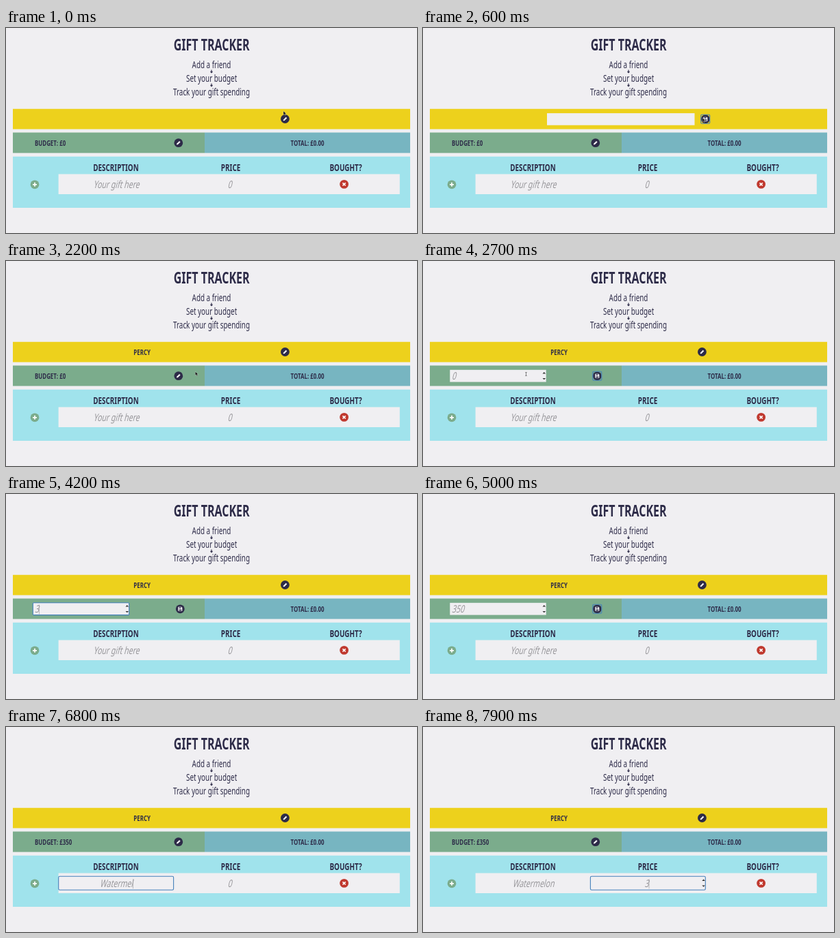
An HTML page that plays this animation: 600x301 px, repeating every 8 s.

```html
<!DOCTYPE html>
<html lang="en">
<head>
<meta charset="utf-8">
<title>Gift tracker</title>
<style>
html, body { margin: 0; width: 100%; height: 100%; overflow: hidden; background: #f0eff2; }
svg { display: block; width: 600px; height: 301px; --narrow: .7; }
text {
  font-family: "Noto Sans", "Open Sans", sans-serif;
  fill: #2d2b48;
  transform-box: fill-box;
  transform-origin: 0 78%;
  transform: scaleX(var(--narrow));
}
.mid { text-anchor: middle; transform-origin: 50% 78%; }
.title { font-size: 22.9px; font-weight: 600; }
.step { font-size: 14.1px; }
.label { font-size: 11.3px; font-weight: 600; }
.head { font-size: 14.1px; font-weight: 600; }
.field { font-size: 15px; fill: #98979b; transform: skewX(-14deg) scaleX(var(--narrow)); }
.box { fill: #f0eff2; }
.ring { fill: none; stroke: #4580bb; stroke-width: 1.1; }
.caret { stroke: #98979b; stroke-width: .6; }
</style>
</head>
<body>
<svg viewBox="0 0 600 301">
  <defs>
    <g id="pencil">
      <circle r="6.4" fill="#2d2b48"/>
      <path d="M-2.8 2.8l.5-1.9 3.6-3.6 1.5 1.5-3.6 3.6z" fill="#fff"/>
    </g>
    <g id="save">
      <circle r="6.4" fill="#2d2b48"/>
      <path d="M-3-3h4.9L3-1.9V3h-6z" fill="#fff"/>
      <path d="M-1.8-2.4h3v1.5h-3zM-1.9.6h3.8v1.8h-3.8z" fill="#2d2b48"/>
    </g>
    <path id="down" d="M0-2.3V1.6M-1.5.2L0 1.8 1.5.2" fill="none" stroke="#2d2b48" stroke-width="1.2"/>
    <path id="spin" d="M-2.3-3.2L0-5.6 2.3-3.2zM-2.3 3.2L0 5.6 2.3 3.2z" fill="#333"/>
  </defs>

  <text class="mid title" x="300" y="32.6">GIFT TRACKER</text>
  <text class="mid step" x="300" y="59.2">Add a friend</text>
  <text class="mid step" x="300" y="79.2">Set your budget</text>
  <text class="mid step" x="300" y="99.2">Track your gift spending</text>
  <use href="#down" x="300" y="63.7"/>
  <use href="#down" x="300" y="83.7"/>

  <path d="M10 118.8h580v29.8H10z" fill="#edd11c"/>
  <path d="M10 153.6h280v30H10z" fill="#7bac8c"/>
  <path d="M290 153.6h300v30H290z" fill="#77b5c1"/>
  <path d="M10 188.8h580v75.2H10z" fill="#a0e3ec"/>
  <path class="box" d="M76.6 214.4h498.2v29.5H76.6z"/>

  <!-- data-t: pairs of on/off times in ms -->
  <g data-t="0 500 2000 8000"><use href="#pencil" x="407.4" y="133.5"/></g>
  <text class="mid label" x="198.5" y="137.6" data-t="2000 8000">PERCY</text>
  <g data-t="500 2000">
    <rect class="box" x="181" y="125.1" width="215.5" height="17.6"/>
    <use href="#save" x="412.3" y="133.7"/>
  </g>
  <rect class="ring" x="181" y="125.1" width="215.5" height="17.6" rx="1.2" data-t="800 1900"/>
  <rect class="ring" x="405.7" y="127.2" width="13" height="13" rx="1.5" data-t="500 800 1900 2000"/>

  <text class="label" x="42" y="172.7" data-t="0 2400">BUDGET: £0</text>
  <text class="label" x="42" y="172.7" data-t="5200 8000">BUDGET: £350</text>
  <g data-t="0 2400 5200 8000"><use href="#pencil" x="251.8" y="168.7"/></g>
  <g data-t="2400 5200">
    <rect class="box" x="39.3" y="159.8" width="140.4" height="17.8"/>
    <use href="#spin" x="176.8" y="168.7"/>
    <use href="#save" x="254.3" y="168.8"/>
  </g>
  <rect class="ring" x="39.3" y="159.8" width="140.4" height="17.8" rx="1.2" data-t="3000 5000"/>
  <rect class="ring" x="247.8" y="162.3" width="13" height="13" rx="1.5" data-t="2400 3000 5000 5200"/>

  <text class="mid label" x="440" y="172.7">TOTAL: £0.00</text>
  <text class="mid head" x="160.5" y="210.4">DESCRIPTION</text>
  <text class="mid head" x="328" y="210.4">PRICE</text>
  <text class="mid head" x="496" y="210.4">BOUGHT?</text>

  <circle cx="42" cy="229.8" r="6.4" fill="#7bac8c"/>
  <path d="M39 229.8h6M42 226.8v6" stroke="#fff" stroke-width="1.7"/>
  <circle cx="493.6" cy="229.4" r="6.4" fill="#c0392f"/>
  <path d="M491.5 227.3l4.2 4.2m0-4.2l-4.2 4.2" stroke="#fff" stroke-width="1.7"/>

  <rect class="ring" x="76.7" y="219.2" width="167.9" height="20" rx="1.7" data-t="5600 7300"/>
  <rect class="ring" x="244.4" y="219.2" width="167.9" height="20" rx="1.7" data-t="7300 8000"/>
  <g data-t="7300 8000"><use href="#spin" x="409.6" y="229.2"/></g>
  <g id="fields"></g>

  <path id="arrow" d="M0 0v5.6l1.4-1.2 1 2.2 1-.5-1-2.1h1.8z" fill="#111" stroke="#fff" stroke-width=".3"/>
  <path id="beam" d="M-1.3-2.4h2.6M0-2.4v4.8M-1.3 2.4h2.6" fill="none" stroke="#555" stroke-width=".7"/>
</svg>
<script>
const LOOP = 8000, STEP = 100;
const $ = id => document.getElementById(id);
const narrow = parseFloat(getComputedStyle(document.querySelector("svg")).getPropertyValue("--narrow"));

const fields = [
  { x: 184, y: 139, show: [500, 2000], focus: [800, 1900], hint: "", text: "Percy",
    keys: [1000, 1100, 1200, 1400, 1500] },
  { x: 42, y: 174, show: [2400, 5200], focus: [3000, 5000], hint: "0", text: "350",
    keys: [4100, 4400, 4600] },
  { x: 161, y: 234.8, mid: true, show: [0, LOOP], focus: [5600, 7300], hint: "Your gift here", text: "Watermelon",
    keys: [6100, 6200, 6300, 6400, 6500, 6700, 6750, 6800, 6900, 7000] },
  { x: 326.5, y: 234.8, mid: true, show: [0, LOOP], focus: [7300, LOOP], hint: "0", text: "3",
    keys: [7800] }
];

// Pointer stops: time, x, y
const path = [
  [0, 405, 122], [300, 408, 132], [1900, 408, 132], [2300, 252, 168], [2400, 252, 168],
  [2700, 150.5, 166], [5100, 150.5, 166], [5500, 182, 231], [LOOP, 182, 231]
];
const arrowTimes = [0, 1000, 1900, 2600, 5100, 5400];
const beamTimes = [2600, 3900, 5400, 6100];

const within = (t, times) => times.some((a, i) => i % 2 === 0 && t >= a && t < times[i + 1]);
const show = (el, on) => el.style.visibility = on ? "visible" : "hidden";

function add(tag, cls) {
  const el = document.createElementNS("http://www.w3.org/2000/svg", tag);
  el.setAttribute("class", cls);
  return $("fields").appendChild(el);
}

for (const f of fields) {
  f.label = add("text", "field" + (f.mid ? " mid" : ""));
  f.label.setAttribute("x", f.x);
  f.label.setAttribute("y", f.y);
  f.caret = add("path", "caret");
}

const timed = [...document.querySelectorAll("[data-t]")]
  .map(el => [el, el.dataset.t.split(" ").map(Number)]);

function drawField(f, t) {
  const count = f.keys.filter(k => k <= t).length;
  const value = f.text.slice(0, count);
  f.label.textContent = value || f.hint;
  show(f.label, within(t, f.show));
  const blinkOn = count > 0 && (t - f.keys[count - 1]) % 1000 < 500;
  show(f.caret, within(t, f.focus) && blinkOn);
  const width = f.label.getComputedTextLength() * narrow;
  f.caret.setAttribute("d", `M${f.x + (f.mid ? width / 2 : width) + .5} ${f.y - 11.5}v14`);
}

function pointer(t) {
  const i = path.findIndex(p => p[0] > t);
  const [t0, x0, y0] = path[i - 1], [t1, x1, y1] = path[i];
  const k = (t - t0) / (t1 - t0), e = k * k * (3 - 2 * k);
  return `translate(${x0 + (x1 - x0) * e} ${y0 + (y1 - y0) * e})`;
}

function draw(t) {
  for (const [el, times] of timed) show(el, within(t, times));
  for (const f of fields) drawField(f, t);
  const place = pointer(t);
  for (const [id, times] of [["arrow", arrowTimes], ["beam", beamTimes]]) {
    $(id).setAttribute("transform", place);
    show($(id), within(t, times));
  }
}

const start = performance.now();
function tick() {
  const t = (performance.now() - start) % LOOP;
  draw(Math.floor(t / STEP) * STEP);
  requestAnimationFrame(tick);
}
tick();
</script>
</body>
</html>
```
